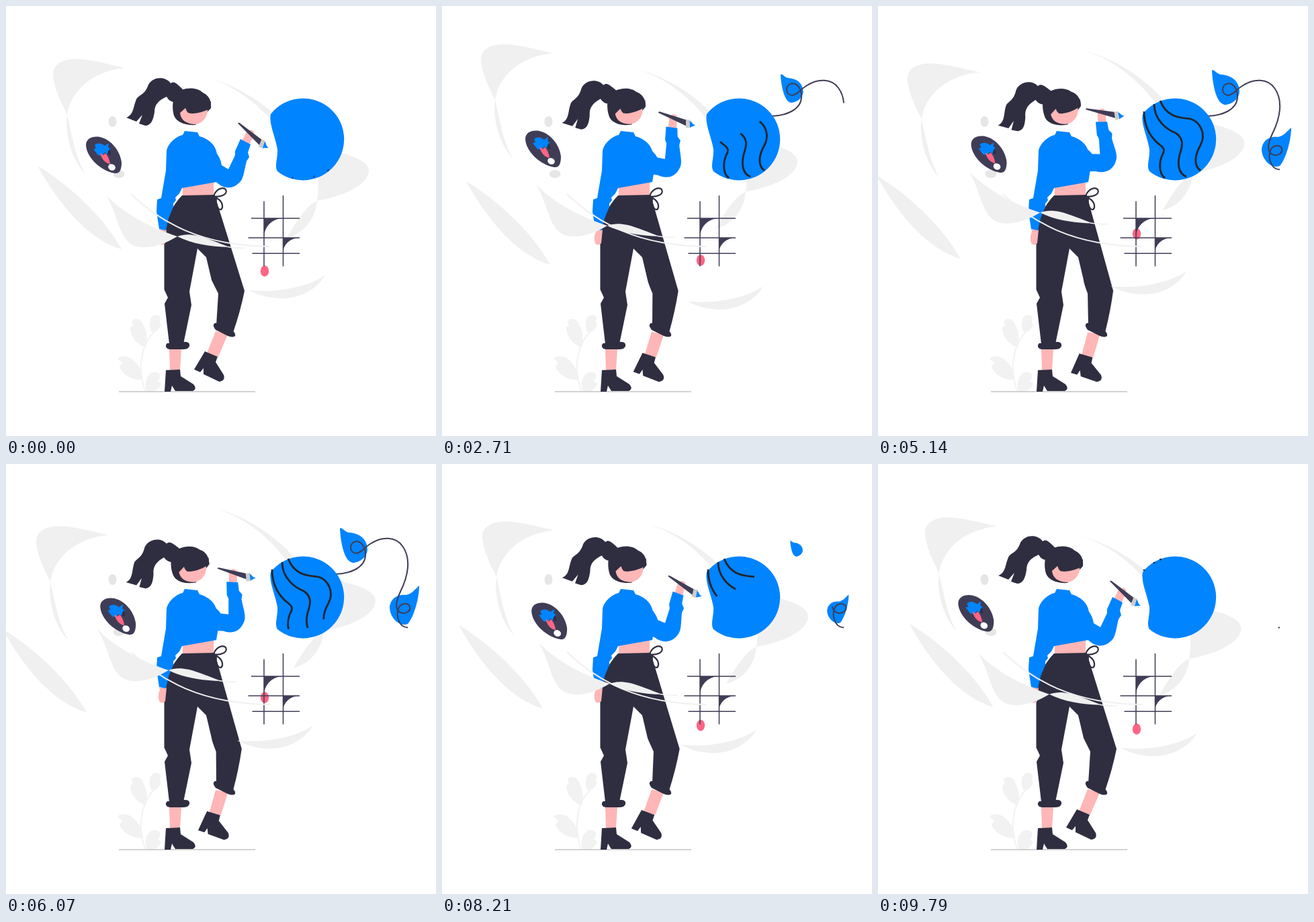
Recreate the animation shown at these times as an HTML page. Size 640 by 640 pixels, loop 9.87 s.

```html
<!DOCTYPE html>
<html lang="en">
<head>
<meta charset="utf-8">
<title>Painter</title>
<style>
  html, body { margin: 0; height: 100%; overflow: hidden; background: #fff; }
  svg { display: block; width: 100vw; height: 100vh; }
  .mist { fill: #f0f0f0; }
  .grey { fill: #e6e6e6; }
  .plant { fill: #f2f2f2; }
  .ink { fill: #2f2e41; }
  .slate { fill: #3f3d56; }
  .blue { fill: #0084ff; }
  .skin { fill: #ffb6b6; }
  .rose { fill: #ff6584; }
  .line { fill: none; stroke: #3f3d56; stroke-width: 2; }
  .stripe { fill: none; stroke: #24242c; stroke-width: 2.8; }
  .veil { fill: none; stroke: #f0f0f0; stroke-width: 2; }
</style>
</head>
<body>
<svg viewBox="0 0 640 640">
  <!-- drifting background -->
  <g id="driftLeft" class="mist">
    <path d="M177 92C150 86 122 78 100 79C75 81 67 93 71 110C74 130 85 148 91 162C96 125 130 97 177 92Z"/>
    <path d="M91 162C87 190 98 230 118 249C104 228 98 192 91 162Z"/>
  </g>
  <path id="driftLow" class="mist" d="M47 238C85 260 142 308 172 362C123 348 79 296 47 238Z"/>
  <g id="driftRight" class="mist">
    <path d="M299 107C340 117 388 143 424 186L408 186C378 146 340 118 299 107Z"/>
    <path d="M478 213C512 221 540 230 540 245C540 265 505 283 463 290C466 270 465 255 460 235Z"/>
    <path d="M463 290C445 298 430 325 418 345C445 338 461 315 463 290Z"/>
  </g>
  <ellipse class="grey" cx="158.500" cy="172" rx="6" ry="8"/>
  <ellipse class="grey" cx="168" cy="250" rx="8.500" ry="6"/>

  <g class="plant">
    <path d="M207 573C194 535 202 497 229 477" fill="none" stroke="#f2f2f2" stroke-width="2"/>
    <path d="M208 508C195 504 185 492 185 478L189 476L187 469C193 463 201 466 204 474C210 484 211 496 208 508Z"/>
    <path d="M216 485C212 473 214 461 222 460C227 459 231 462 230 467L228 470L231 473C229 481 224 486 216 485Z"/>
    <path d="M203 556C188 558 174 549 169 537L173 531L166 525C169 520 180 520 187 525C197 533 203 544 203 556Z"/>
    <path d="M209 573C205 560 211 546 220 545C227 544 231 549 229 554L226 558L231 562C229 569 224 573 218 574Z"/>
  </g>
  <path d="M168 574H371" stroke="#c4c4c4" stroke-width="1.600"/>

  <!-- flower -->
  <g id="leafA"><path class="blue" d="M497 96C499 93 504 101 510 102C528 103 538 113 538 128C537 138 527 147 516 147C503 145 498 115 497 96Z"/></g>
  <g id="leafB"><path class="blue" d="M615 181C615 200 607 228 598 238C586 243 571 229 571 213C573 198 585 194 595 195C604 194 609 186 615 181Z"/></g>
  <path id="stem" class="line" pathLength="1" d="M490 164C512 163 534 155 535 136C536 122 527 114 520 115.500C510 118 511 132 521 133C530 132 532 125 542 119C560 107 580 108 590 122C604 141 598 168 587 190C579 207 579 217 587 221C595 224 603 219 601 212C599 207 590 206 585 213C580 223 583 243 598 243.500"/>
  <path class="blue" d="M394 161A61 61 0 1 1 404 246C399 238 405 226 404 213C401 195 391 175 394 161Z"/>
  <path class="stripe" pathLength="1" d="M427 256C417 249 419 231 423 222C430 211 421 209 414 202C402 190 396 176 396 157"/>
  <path class="stripe" pathLength="1" d="M459 254C446 249 446 233 449 221C454 207 455 197 443 189C430 184 411 170 411 146"/>
  <path class="stripe" pathLength="1" d="M480 245C469 237 472 221 480 207C489 190 479 172 465 168C452 166 430 167 420 141"/>

  <!-- grid -->
  <ellipse id="drop" class="rose" cx="385" cy="394.500" rx="6.200" ry="8.300"/>
  <path class="line" style="stroke-width:1.500" d="M384 290.500V387.500M412.500 282V387.500M365 316H437M360.500 345H437M366.500 368.300H437"/>
  <path class="slate" d="M384 316H412A28 28 0 0 0 384 345ZM412 345H437A25 23 0 0 0 412 368Z"/>

  <!-- legs -->
  <path class="skin" d="M243 510H261L259 542H244ZM263 268L309 262V283H263Z"/>
  <path class="ink" d="M238 542L259 541L260 551L279 563Q285 570 278 573H252L247 565L245 574H236Z"/>
  <g id="foot">
    <path class="skin" d="M312 484L330 489L316 522L299 517Z"/>
    <path class="ink" d="M296 514L315 522L312 530L324 549Q327 558 317 559L294 548V539L289 545L280 541Z"/>
  </g>
  <path id="pants" class="ink"/>
  <path class="ink" d="M243 499L268 500Q274 501 273 506Q272 511 264 511H244Q237 510 238 505Q239 501 243 502ZM313 472L337 483Q342 487 341 491Q338 494 330 491L312 482Q308 477 309 474Q311 471 313 472Z"/>
  <path fill="none" stroke="#2f2e41" stroke-width="2.200" d="M309 285C310 274 322 268 327 273C331 281 318 285 309 283C316 287 323 291 322 300C319 308 311 299 313 286"/>

  <!-- torso and arms -->
  <path class="skin" d="M228 333L239 333L237 353Q232 358 228 353Q225 344 229 336Z"/>
  <path class="blue" d="M266 186L285 188L288 194C300 197 310 205 313 216L317 238L313 262L262 271L258 279L252 285L253 289L249 294V299L242 316L238 334L228 332L224 306L225 288L231 286L238 245L239 216C240 206 252 194 263 192Z"/>
  <g id="arm">
    <path class="skin" d="M350 204L358 187C360 183 369 184 369 188C371 193 367 198 366 198L361 210Z"/>
    <path class="blue" d="M294 203C308 208 320 225 321 237L331 243L341 222V216L349 198L364 206L360 218L362 225L358 231C354 247 354 258 346 264C334 275 321 270 313 262L290 250Z"/>
    <path class="slate" d="M345 174.500L347 173.500L382 200L377 207Z"/>
    <path d="M380 199L386 200.500L383 212L376 210Z" fill="#ccc"/>
    <path class="blue" d="M385 202C388 204 386 208 391 211L382 211.500Z"/>
  </g>

  <g id="head">
    <path class="ink" d="M179 166C191 162 189 148 195 137C201 131 207 131 212 117C219 105 237 104 245 115C250 111 254 115 264 125L253 143Q244 144 239 135C228 140 221 146 221 158C219 170 216 178 207 178L198 175L203 162L194 172Z"/>
    <path class="ink" d="M250 163C246 150 248 129 261 125C274 120 287 123 293 129C302 133 306 141 305 152L282 177C266 178 254 173 250 163Z"/>
    <path class="skin" d="M259 159L267 152L300 153C301 166 291 176 280 176C267 175 260 169 259 159Z"/>
    <path class="ink" d="M267 151L305 142V152C296 157 280 162 271 159Q268 156 267 151Z"/>
  </g>

  <!-- front veil -->
  <g id="driftBand">
    <path class="mist" d="M149 282C175 307 205 326 255 343C235 355 217 360 201 359C167 356 170 315 149 282ZM255 343C278 335 298 346 333 359C303 358 277 354 255 343Z"/>
    <path class="veil" style="stroke-width:1.500" d="M330 358.500Q343 361 356 360"/>
  </g>
  <path class="veil" d="M186 280C230 322 290 357 393 358"/>
  <path id="driftFoot" class="mist" d="M362 423C400 427 445 420 475 401C450 440 400 443 362 423Z"/>

  <g id="palette">
    <path class="slate" d="M119 207C119 197 129 193 140 195C157 199 170 216 172 233C172 244 169 250 162 249C143 246 120 227 119 207Z"/>
    <path class="blue" d="M130 213L134 212L132 207C137 203 142 204 147 208L153 204L152 210L156 213L153 222L147 218L143 223L137 222Z"/>
    <path class="rose" d="M140 219L145 222L148 219C152 223 154 229 155 235C147 234 143 228 140 219Z"/>
    <path class="ink" d="M152 216L155 212L156 222L151 221Z"/>
    <ellipse cx="157.500" cy="240" rx="5.500" ry="4.700" transform="rotate(25 157.500 240)" fill="#fff"/>
  </g>
</svg>
<script>
const LOOP = 9870;
const KEYS = [0, 1430, 2710, 4210, 6070, 8210];
const el = id => document.getElementById(id);
const clamp = u => Math.min(1, Math.max(0, u));
const span = (t, a, b) => clamp((t - a) / (b - a));
const smooth = u => u * u * (3 - 2 * u);

// Smooth periodic curve through the key times; every track rests at 0 when the loop starts.
function track(...values) {
  const v = [0, ...values], n = KEYS.length;
  const time = i => KEYS[(i + n) % n] + Math.floor(i / n) * LOOP;
  const val = i => v[(i + n) % n];
  const rate = i => (val(i + 1) - val(i)) / (time(i + 1) - time(i));
  const slope = i => {
    const before = time(i) - time(i - 1), after = time(i + 1) - time(i);
    return (rate(i - 1) * after + rate(i) * before) / (before + after);
  };
  return t => {
    let i = n - 1;
    while (KEYS[i] > t) i--;
    const h = time(i + 1) - time(i), u = (t - time(i)) / h, w = 1 - u;
    return w * w * (1 + 2 * u) * val(i) + u * u * (3 - 2 * u) * val(i + 1)
      + h * u * w * (w * slope(i) - u * slope(i + 1));
  };
}

const lean = track(.27, .66, 1, .84, .27);
const dropRise = track(-4, -16, -53, -47, -5.5);
const drifts = {
  driftLeft: [track(-5, -12, -24, -25, -10), track(-12.5, -22, -4, 13.5, 6.5)],
  driftLow: [track(-4, -11, -39, -52, -22), track(13, 23, 20, 8, 2)],
  driftRight: [track(-7.5, -11, -1, 10, 5), track(-6.5, -13.5, -34.5, -41.5, -18)],
  driftBand: [track(-4.5, -9, -13, -13, -5.5), track(-8, -16, -30.5, -36, -16)],
  driftFoot: [track(1.5, 3, -10, -18, -7), track(8.5, 16.5, 2.5, -11.5, -5)],
  palette: [track(1, 5, 15.5, 21.2, 14.2), track(-5.5, -9, -6.5, 5, 12)]
};

const move = (id, x, y) => el(id).setAttribute("transform", `translate(${x} ${y})`);
const turn = (id, angle, x, y) => el(id).setAttribute("transform", `rotate(${angle} ${x} ${y})`);
const grow = (id, s, x, y) =>
  el(id).setAttribute("transform", `translate(${x} ${y}) scale(${s}) translate(${-x} ${-y})`);

function trim(path, from, to) {
  path.style.visibility = to > from ? "visible" : "hidden";
  path.style.strokeDasharray = `${Math.max(0, to - from)} 3`;
  path.style.strokeDashoffset = -from;
}

const stripes = document.querySelectorAll(".stripe");

function draw(t) {
  for (const id in drifts) move(id, drifts[id][0](t), drifts[id][1](t));
  move("drop", 0, dropRise(t));

  const p = lean(t), k = 5 * p;
  turn("head", -7 * p, 277, 175);
  turn("arm", -30 * p, 288, 233);
  turn("foot", -7 * p, 325, 485);
  el("pants").setAttribute("d", `M262 282L310.500 281L${355 - k} 424
    Q${349 - .6 * k} 454 338 486L313 475L${316 - .8 * k} 428Q${308 - .4 * k} 412 306 408L298 374L285 361
    L273 425L276 445L264 503H243L236 443L241 434L235.500 422V340C238 318 246 298 262 282Z`);

  const stripeFrom = span(t, 5600, 9850), stripeTo = span(t, -50, 4935);
  stripes.forEach(s => trim(s, stripeFrom, stripeTo));
  trim(el("stem"),
    Math.min(.994, 1 - (1 - span(t, 7000, LOOP)) ** 2.6),
    Math.sin(span(t, 1450, 4700) * Math.PI / 2));
  grow("leafA", smooth(span(t, 1800, 3050)) - smooth(span(t, 7550, 8800)), 536, 130);
  grow("leafB", smooth(span(t, 3390, 4640)) - smooth(span(t, 7790, 9040)), 579, 231);
}

function tick() {
  const t = performance.now() % LOOP;
  draw(Math.floor((t + 6) * .014) / .014 % LOOP); // 14 poses a second
  requestAnimationFrame(tick);
}
tick();
</script>
</body>
</html>
```
